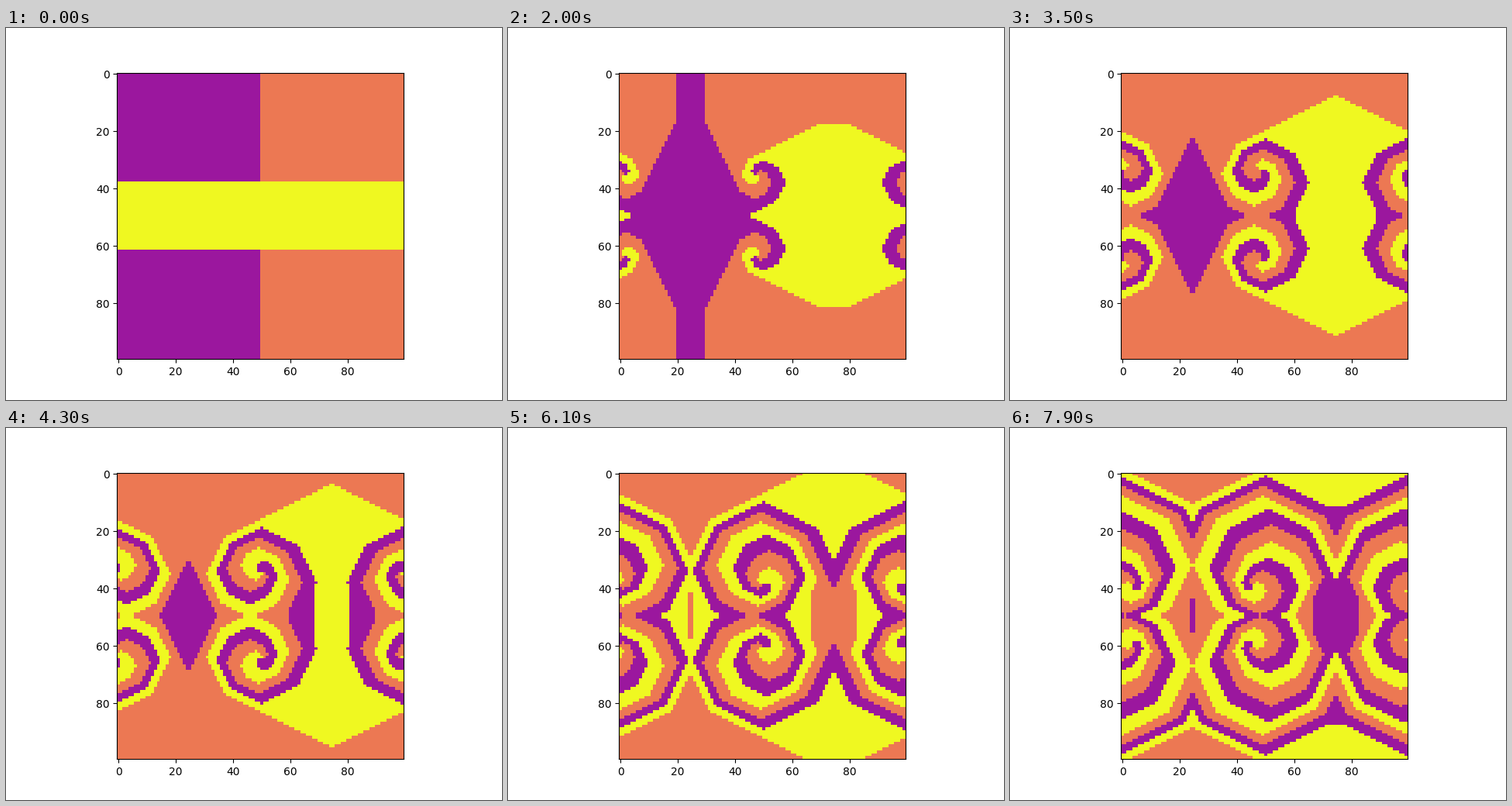
These frames come from a looping animation (640 by 480 pixels, 8000 ms). A matplotlib script:

```python
import numpy as np
import matplotlib.pyplot as plt
from matplotlib.animation import FuncAnimation

SIZE = 100
STEPS = 80
INTERVAL = 100
THRESHOLD = 3
PURPLE, ORANGE, YELLOW = 1, 2, 3
# Each state is replaced by the one that beats it.
BEATEN_BY = {PURPLE: ORANGE, ORANGE: YELLOW, YELLOW: PURPLE}
OFFSETS = [(dy, dx) for dy in (-1, 0, 1) for dx in (-1, 0, 1) if dy or dx]


def initial_grid():
    grid = np.full((SIZE, SIZE), PURPLE)
    grid[:, SIZE // 2:] = ORANGE
    grid[38:62, :] = YELLOW
    return grid


def count_neighbours(grid, state):
    mask = (grid == state).astype(int)
    return sum(np.roll(mask, shift, axis=(0, 1)) for shift in OFFSETS)


def step(grid):
    new = grid.copy()
    for loser, winner in BEATEN_BY.items():
        new[(grid == loser) & (count_neighbours(grid, winner) >= THRESHOLD)] = winner
    return new


history = [initial_grid()]
while len(history) < STEPS:
    history.append(step(history[-1]))

fig, ax = plt.subplots(figsize=(6.4, 4.8), dpi=100)
image = ax.imshow(history[0], cmap="plasma", vmin=0, vmax=3, interpolation="nearest")


def update(i):
    image.set_data(history[i])
    return (image,)


anim = FuncAnimation(fig, update, frames=STEPS, interval=INTERVAL,
                     repeat=True, repeat_delay=0)
plt.show()
```
